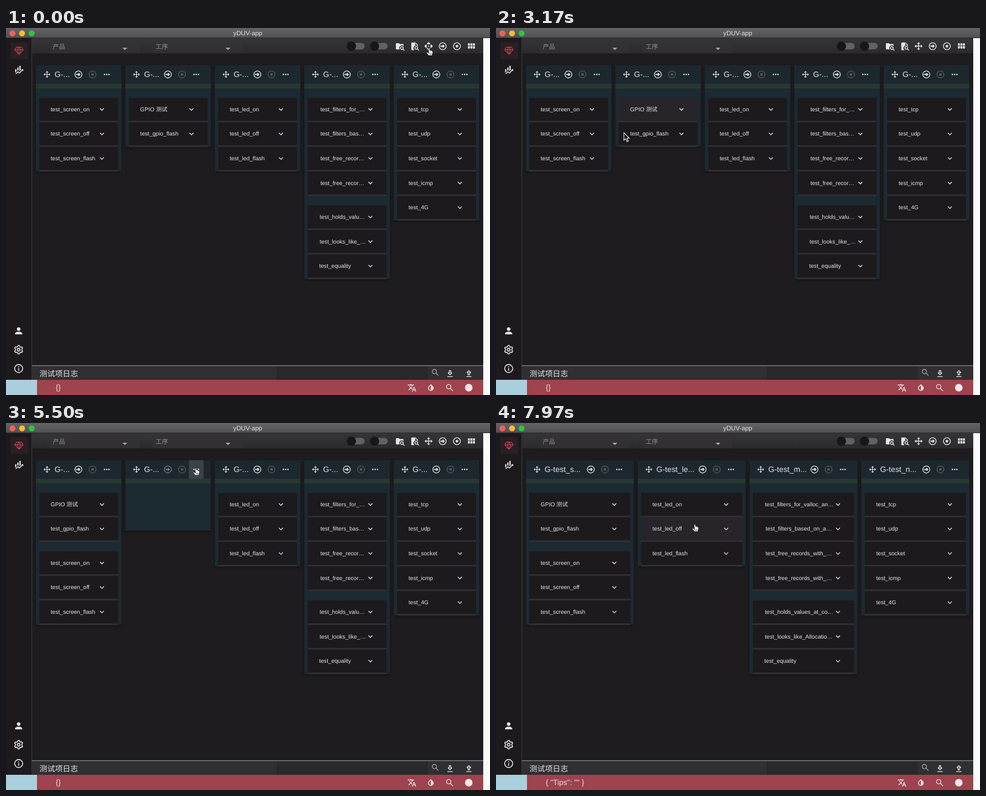
An HTML page for the animation above (8000 ms loop, 859 by 652 pixels).

```html
<!DOCTYPE html>
<html lang="zh">
<head>
<meta charset="utf-8">
<title>yDUV-app</title>
<style>
html, body { margin: 0; width: 100%; height: 100%; overflow: hidden; background: #1e1c1f; }
svg { display: block; width: 859px; height: 652px; }
text { font-family: "Liberation Sans", "Noto Sans CJK SC", "Noto Sans CJK", sans-serif; text-rendering: geometricPrecision; white-space: pre; }
</style>
</head>
<body>
<svg id="stage" viewBox="0 0 859 652">
  <defs>
    <linearGradient id="bar" x2="0" y2="1"><stop stop-color="#646466"/><stop offset="1" stop-color="#505052"/></linearGradient>
    <linearGradient id="tools" x2="0" y2="1"><stop stop-color="#353437"/><stop offset="1" stop-color="#2b2a2d"/></linearGradient>
    <filter id="soft" x="-20%" y="-20%" width="140%" height="150%"><feDropShadow dx="0" dy="2" stdDeviation="2.5" flood-color="#000" flood-opacity=".45"/></filter>
  </defs>
  <g id="frame"></g>
  <g id="mode"></g>
  <g id="board"></g>
  <g id="overlay"></g>
  <g id="pointer"></g>
</svg>
<script>
const LOOP = 8000, ROW = 43.6, GAP = 16.8, TOP = 124;
const WHITE = '#e6e5e7', DIM = '#57595d';
const el = id => document.getElementById(id);

const rect = (x, y, w, h, fill, more = '') =>
  `<rect x="${x}" y="${y}" width="${w}" height="${h}" fill="${fill}" ${more}/>`;
const disc = (x, y, r, fill) => `<circle cx="${x}" cy="${y}" r="${r}" fill="${fill}"/>`;
const text = (s, x, y, size, fill = WHITE, more = '') =>
  `<text x="${x}" y="${y}" font-size="${size}" fill="${fill}" ${more}>${s}</text>`;

// Icons live on a 24 unit grid; the second entry of a pair is drawn as strokes.
const ring = 'M12 3a9 9 0 1 0 0 18a9 9 0 1 0 0-18z';
const gear = () => {
  let d = '';
  for (let i = 0; i < 24; i++) {
    const a = (i - .5) * Math.PI / 12, r = i % 4 < 2 ? 9.6 : 7.2;
    d += `${i ? 'L' : 'M'}${(12 + r * Math.sin(a)).toFixed(2)} ${(12 - r * Math.cos(a)).toFixed(2)}`;
  }
  return d + 'z';
};
const ICONS = {
  move: ['M13 6V11H18V7.75L22.25 12L18 16.25V13H13V18H16.25L12 22.25L7.75 18H11V13H6V16.25L1.75 12L6 7.75V11H11V6H7.75L12 1.75L16.25 6z'],
  spread: ['M14 12l-2 2-2-2 2-2zM12 6l2.1 2.1 2.5-2.5L12 1 7.4 5.6l2.5 2.5zM6 12l2.1-2.1-2.5-2.5L1 12l4.6 4.6 2.5-2.5zM18 12l-2.1 2.1 2.5 2.5L23 12l-4.6-4.6-2.5 2.5zM12 18l-2.1-2.1-2.5 2.5L12 23l4.6-4.6-2.5-2.5z'],
  run: ['M6 10.4h6V7l5.5 5-5.5 5v-3.4H6z', ring],
  stop: ['M9 9h6v6H9z', ring],
  dots: ['M4 12a2 2 0 1 0 4 0a2 2 0 1 0-4 0M10 12a2 2 0 1 0 4 0a2 2 0 1 0-4 0M16 12a2 2 0 1 0 4 0a2 2 0 1 0-4 0'],
  chevron: ['M7.41 8.59L12 13.17l4.59-4.58L18 10l-6 6-6-6z'],
  folder: ['M9 4l2 2h8a2 2 0 0 1 2 2v3.8A6.5 6.5 0 0 0 11 20H3a2 2 0 0 1-2-2V6a2 2 0 0 1 2-2z', 'M13 16.5a3.5 3.5 0 1 0 7 0a3.5 3.5 0 1 0-7 0M19 19l4 4'],
  file: ['M5 2h9l6 6v3.5A6.5 6.5 0 0 0 11 22H5a2 2 0 0 1-2-2V4a2 2 0 0 1 2-2M13 3.5V9h5.5z', 'M12.5 16a3.5 3.5 0 1 0 7 0a3.5 3.5 0 1 0-7 0M18.5 18.5l4 4'],
  grid: ['M3 5h5v6H3zM9.5 5h5v6h-5zM16 5h5v6h-5zM3 12.5h5v6H3zM9.5 12.5h5v6h-5zM16 12.5h5v6h-5z'],
  gem: ['', 'M6 4h12l4 6-10 11L2 10zM2 10h20M8 10l4 11 4-11-4-6z'],
  trend: ['M6 16.5l-3 2.9V11h3M11 14.7l-1.6-1.4L8 14.6V7h3M16 13l-3 3V3h3M18.8 12.8L17 11h5v5l-1.8-1.8-7.2 7.2-3.5-3L5.8 22H3l6.5-6.3 3.5 2.9z'],
  user: ['M12 4a4 4 0 1 1 0 8a4 4 0 0 1 0-8M12 14c4.4 0 8 1.8 8 4v2H4v-2c0-2.2 3.6-4 8-4z'],
  cog: ['', gear() + 'M9 12a3 3 0 1 0 6 0a3 3 0 1 0-6 0'],
  info: ['M11 7h2v2h-2zM11 11h2v6h-2z', ring],
  find: ['', 'M4 9.5a5.5 5.5 0 1 0 11 0a5.5 5.5 0 1 0-11 0M14 14l6 6'],
  down: ['', 'M10 4h4v6h3l-5 5-5-5h3zM5 20h14'],
  up: ['', 'M10 15h4V9h3l-5-5-5 5h3zM5 20h14'],
  words: ['M12.9 15.1l-2.6-2.5A17.5 17.5 0 0 0 14.1 6H17V4h-7V2H8v2H1v2h11.2A15 15 0 0 1 9 11.4 14 14 0 0 1 6.7 8h-2a18 18 0 0 0 3 4.6l-5.1 5L4 19l5-5 3.1 3.1zM18.5 10h-2L12 22h2l1.1-3h4.8l1.1 3h2zM15.9 17l1.6-4.3 1.6 4.3z'],
  drop: ['M12 2L6.3 7.6A8 8 0 1 0 17.7 7.6zM12 4.8V19A6 6 0 0 1 7.8 9z'],
  insert: ['', 'M1 12h16M12 7l5 5-5 5M22 4v16'],
  trash: ['M8 9h8l-1 8.5H9zM7.500 6.500h9v1.500h-9z', ring]
};
function icon(name, x, y, size = 16, color = WHITE, line = 2) {
  const [solid, lines] = ICONS[name], k = size / 24;
  return `<g transform="translate(${x - size / 2} ${y - size / 2}) scale(${k})">` +
    (solid ? `<path d="${solid}" fill="${color}" fill-rule="evenodd"/>` : '') +
    (lines ? `<path d="${lines}" fill="none" stroke="${color}" stroke-width="${line}" stroke-linejoin="round"/>` : '') + '</g>';
}

function drawFrame() {
  let s = rect(0, 0, 859, 652, '#1e1c1f') + rect(0, 18, 45, 607, '#1c1a1d') + rect(45, 18, 1.5, 607, '#343336');
  s += rect(46, 18, 801, 27, 'url(#tools)') + rect(0, 0, 859, 18, 'url(#bar)') + rect(0, 17.2, 859, .8, '#232224');
  ['#fb5f57', '#fdbc2e', '#28c840'].forEach((c, i) => s += disc(11.500 + i * 17, 9.500, 5.200, c));
  s += text('yDUV-app', 429, 13.2, 11.3, '#e2e2e3', 'text-anchor="middle"');
  s += rect(8, 25, 31, 30, '#292023', 'rx="2"') + icon('gem', 23, 40, 18, '#a84450', 1.700);
  s += icon('trend', 23, 74, 18) + icon('user', 22.500, 538, 19) + icon('cog', 22.500, 571.500, 19) + icon('info', 22.500, 605, 19);
  [['产品', 83, 211], ['工序', 265.500, 394]].forEach(([label, x, arrow]) => {
    s += rect(x - 5, 18, 159, 27, '#343336', 'opacity=".6"') + text(label, x, 36.5, 11, '#929194');
    s += `<path d="M${arrow - 4.500} 35h9l-4.500 4.300z" fill="#a3a2a4"/>`;
  });
  [613, 654].forEach(x => s += rect(x - 5, 26.500, 28.500, 11.500, '#626164', 'rx="5.700"') + disc(x, 32.300, 8.300, '#171618'));
  s += icon('folder', 699.500, 32.500, 16.500) + icon('file', 725.500, 32.500, 16.500);
  s += icon('run', 775, 32.300, 16.500) + icon('stop', 800.300, 32.300, 16.500) + icon('grid', 826, 32, 16.500);
  s += rect(46, 599, 801, 1.8, '#77767a') + rect(46, 600.8, 801, 24.2, '#29282b') + rect(46, 601, 434, 24, '#302f32') + rect(749, 601, 98, 24, '#302f32');
  s += text('测试项日志', 59.5, 618.8, 13.7) + icon('find', 762, 612, 16.500, '#a3a2a5');
  s += icon('down', 788, 614, 16) + icon('up', 821.500, 614, 16);
  s += rect(55, 625, 792, 27, '#9f434e') + rect(0, 625, 55, 27, '#a9cfdc');
  s += icon('words', 720.500, 639, 16.500) + icon('drop', 754, 639, 15) + icon('find', 787.500, 639, 17) + disc(821.300, 639, 6.700, '#f1e7e8');
  s += rect(847, 18, 12, 634, '#fafafb');
  el('frame').innerHTML = s;
}

const gpio = ['GPIO 测试', 'test_gpio_flash'];
const screen = ['test_screen_on', 'test_screen_off', 'test_screen_flash'];
const led = ['test_led_on', 'test_led_off', 'test_led_flash'];
const net = ['test_tcp', 'test_udp', 'test_socket', 'test_icmp', 'test_4G'];
const narrow = [
  ['test_filters_for_…', 'test_filters_bas…', 'test_free_recor…', 'test_free_recor…'],
  ['test_holds_valu…', 'test_looks_like_…', 'test_equality']
];
const wide = [
  ['test_filters_for_valloc_an…', 'test_filters_based_on_a…', 'test_free_records_with_…', 'test_free_records_with_…'],
  ['test_holds_values_at_co…', 'test_looks_like_Allocatio…', 'test_equality']
];
const nudge = s => !s.endsWith('…') ? 0 : /filters_for_v|looks|holds/.test(s) ? 1 : 2.2;

function cards(list, x, y, w, lit) {
  return list.map((name, i) => {
    const top = y + i * ROW;
    return rect(x, top, w, 41, name === lit ? '#27252a' : '#1c1a1d', 'rx="1.5"') + rect(x, top + 40.8, w, 3.2, '#302f33') +
      text(name, x + 20.3 + nudge(name), top + 23.800, 10.1) + icon('chevron', x + w - 28.500, top + 20.500, 16);
  }).join('');
}

function column(x, w, title, groups, o = {}) {
  const count = groups.flat().length;
  const h = o.h || TOP - 66 + count * ROW + GAP * (groups.length - 1) - 0.5;
  const r = x + w;
  let s = rect(x, 66, w, h, '#1f2a31', 'filter="url(#soft)"') + rect(x, 66, w, 33, '#1d272e') + rect(x, 99, w, 8.5, '#273830');
  if (o.open) s += rect(r - 39, 66, 26, 33, '#3a4349');
  s += icon('move', x + 19.800, 82.500, 14) + text(title, x + 33.3, 87, 13.8);
  s += icon('run', r - 76.300, 82.500, 16.500, o.idle ? '#777b7f' : WHITE) + icon('stop', r - 51.200, 82.500, 16.500, DIM) + icon('dots', r - 26, 82.500, 16);
  let y = TOP + (o.push || 0);
  groups.forEach(g => {
    s += cards(g, x + 6, y, w - 12, o.lit);
    y += g.length * ROW + GAP;
  });
  return s;
}

const DRAG = 3470, DROP = 3800, LANDED = 4100, SETTLED = 5270, REMOVED = 7430;
const clamp = v => Math.max(0, Math.min(1, v));
const ramp = (t, a, b) => { const p = clamp((t - a) / (b - a)); return p * p * (3 - 2 * p); };

function boardAt(t) {
  const n = t < REMOVED ? 5 : 4, w = (787 - 7 * (n - 1)) / n;
  const at = i => 53 + i * (w + 7);
  if (n === 4) return column(at(0), w, 'G-test_s...', [gpio, screen]) +
    column(at(1), w, 'G-test_le...', [led], { lit: t > 7800 ? 'test_led_off' : '' }) +
    column(at(2), w, 'G-test_m...', wide) + column(at(3), w, 'G-test_n...', [net]);

  const settled = t >= SETTLED, title = 'G-...';
  const first = settled ? column(at(0), w, title, [gpio, screen])
    : column(at(0), w, title, [screen], { h: 188.5, push: 2 * ROW * ramp(t, 3550, 3700) });
  const second = t < DRAG ? column(at(1), w, title, [gpio], { lit: t > 2850 ? gpio[0] : '' })
    : column(at(1), w, title, [[]], { h: settled ? 125 : 145, idle: settled, open: t >= 5500 && t < 6700 });
  return first + second + column(at(2), w, title, [led]) + column(at(3), w, title, narrow) + column(at(4), w, title, [net]);
}

// time, x, y of the pointer's tip
const PATH = [
  [100, 751, 36], [470, 708, 76], [800, 708, 76], [1100, 690, 100], [1600, 751, 36], [2070, 751, 36],
  [2330, 700, 74], [2870, 290, 140], [3170, 227, 186], [3300, 227, 186], [3470, 291, 131], [3700, 161, 169.5],
  [4300, 161, 169.5], [4870, 342, 85.5], [5030, 337, 80], [5800, 337, 80], [6230, 373, 127], [6570, 373, 163],
  [7800, 373, 163], [7970, 353, 180]
];
function pointerAt(t) {
  const i = PATH.findIndex(p => p[0] > t);
  if (i < 0) return PATH[PATH.length - 1].slice(1);
  if (!i) return PATH[0].slice(1);
  const [a, x, y] = PATH[i - 1], [b, u, v] = PATH[i], p = ramp(t, a, b);
  return [x + (u - x) * p, y + (v - y) * p];
}

function overlayAt(t) {
  let s = '';
  const tip = ramp(t, 1500, 1650) * (1 - .35 * ramp(t, 2150, 2330)) * (1 - ramp(t, 2335, 2430));
  if (tip) s += `<g opacity="${tip}">` + rect(717, 70, 65, 23.500, '#a2a2a3', 'rx="3"') +
    text('允许拖拽', 749.5, 85.4, 9.3, '#3c3c3e', 'text-anchor="middle"') + '</g>';
  if (t >= DRAG && t < LANDED) {
    const [px, py] = pointerAt(Math.min(t, DROP)), p = ramp(t, DROP, LANDED);
    const x = px - 73, y = py - 7;
    s += '<g filter="url(#soft)">' + cards(gpio, x + (59 - x) * p, y + (TOP - y) * p, 139.8) + '</g>';
  }
  const menu = ramp(t, 5500, 5630) * (1 - ramp(t, 6670, 6760));
  if (menu) s += `<g opacity="${menu}">` + rect(325.5, 113, 94.5, 81.5, '#1c1a1d', 'rx="3" filter="url(#soft)"') +
    icon('insert', 355, 136, 14, '#c9c8ca', 1.800) + text('新建组', 372, 140, 11.2) +
    icon('trash', 355, 170, 17, '#c9c8ca', 1.800) + text('删除组', 372, 174, 11.2) + '</g>';
  return s + text(t < REMOVED ? '{}' : '{ "Tips": "" }', 88.3, 643.2, 13.5, '#ecdfe1');
}

const ARROW = '<path d="M0 0V13.500L3.200 10.600 5.500 16 7.800 15 5.500 9.800H9.500z" fill="#111" stroke="#f4f4f4" stroke-width="1.100"/>';
const HAND = '<path d="M-1.500 1C-1.500-.5.500-.5.900 1L1.600 4C2.300 3 3.300 3.200 3.600 4.300 4.400 3.800 5.200 4.400 5.300 5.200 6.300 5 6.700 6 6.500 7.500L5.200 13H-.500L-4.500 8.800C-5.300 7.500-4 6.500-2.900 7.300L-.800 9z" fill="#f6f6f6" stroke="#161616" stroke-width=".9"/><path d="M1.500 8.500v3M3.300 8.500v3" stroke="#222" stroke-width=".7"/>';

const shown = {};
function put(id, html) {
  if (shown[id] !== html) el(id).innerHTML = shown[id] = html;
}
function render(t) {
  put('mode', icon(t < 1600 ? 'spread' : 'move', 750, 32.300, 16.500));
  put('board', boardAt(t));
  put('overlay', overlayAt(t));
  const [x, y] = pointerAt(t);
  put('pointer', t > 2900 && t < 5000 ? ARROW : HAND);
  el('pointer').setAttribute('transform', `translate(${x} ${y})`);
}

drawFrame();
const start = performance.now();
function tick() {
  render((performance.now() - start) % LOOP);
  requestAnimationFrame(tick);
}
tick();
</script>
</body>
</html>
```
